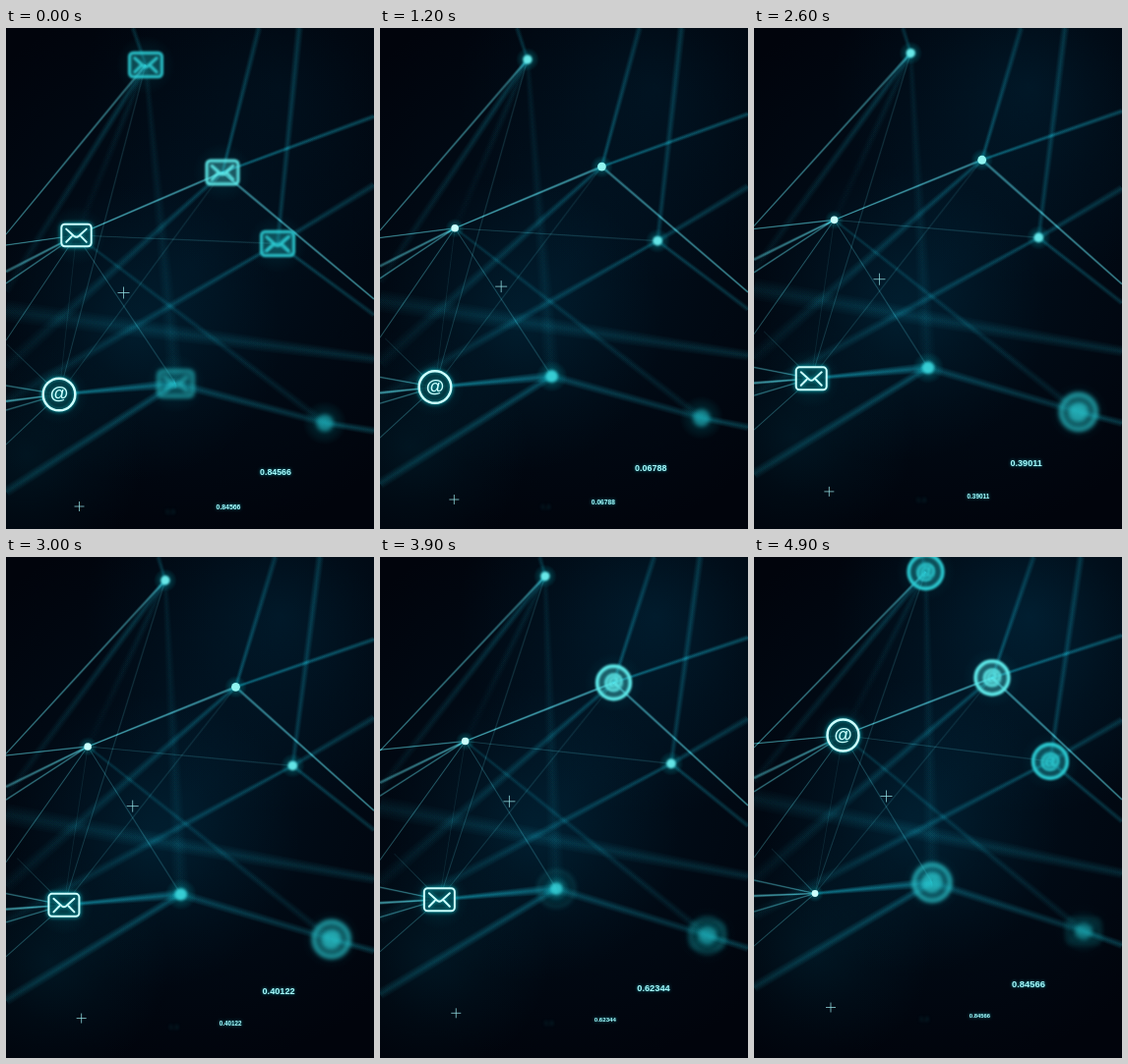
Recreate the animation shown at these times as an HTML page with a canvas. Size 374 by 510 pixels, loop 5000 ms.

```html
<!DOCTYPE html>
<html lang="en">
<head>
<meta charset="utf-8">
<title>Message network</title>
<style>
  html, body { margin: 0; width: 100%; height: 100%; overflow: hidden; background: #01050d; }
  canvas { display: block; width: 374px; height: 510px; }
</style>
</head>
<body>
<canvas id="stage" width="374" height="510"></canvas>
<script>
const W = 374, H = 510, LOOP = 5000, STEP = 100;
const ctx = document.getElementById('stage').getContext('2d');

// Drifting points: x, y at the start and at the end of the loop.
const nodes = {
  A: { path: [142, 37.5, 174.5, 15], r: 4.6, blur: 1.2, size: 1.06, tone: '105,232,232' },
  B: { path: [220, 147, 242, 123], r: 4.4, blur: 0.8, size: 1.03, tone: '145,245,240' },
  C: { path: [71.5, 211, 90.5, 181.5], r: 3.8, blur: 0.4, size: 0.98, tone: '200,255,252' },
  D: { path: [276, 219.5, 301, 208], r: 4.8, blur: 1.2, size: 1.06, tone: '100,228,230' },
  E: { path: [54, 373, 62, 342.5], r: 3.4, blur: 0.3, size: 1, tone: '205,255,252' },
  F: { path: [172.5, 362, 181, 331.5], r: 6.2, blur: 1.9, size: 1.12, tone: '55,205,212' },
  G: { path: [324, 402, 335, 381], r: 8.6, blur: 2.8, size: 1.08, tone: '35,185,195' }
};

// Icon, time it comes in, time it leaves, fade length, strength.
const icons = {
  A: [['mail', -900, 500, 400, .9], ['at', 4000, 6000, 600, .95]],
  B: [['mail', -900, 500, 400, .95], ['at', 3100, 6000, 500, 1]],
  C: [['mail', -900, 500, 400, 1], ['at', 3900, 6000, 500, 1]],
  D: [['mail', -900, 500, 400, .9], ['at', 4000, 6000, 600, .95]],
  E: [['at', -900, 2200, 200, 1], ['mail', 2300, 4500, 200, 1]],
  F: [['mail', -900, 400, 500, .7], ['at', 3800, 6000, 600, .85]],
  G: [['at', 1500, 3600, 400, .9], ['mail', 3800, 4500, 500, .75]]
};

// Anchors on the edges of the stage.
const onLeft = (a, b) => [0, a, 0, b];
const onRight = (a, b) => [W, a, W, b];
const onTop = (a, b) => [a, 0, b, 0];

// From, to, width at each end, strength at each end.
const sharp = [
  ['A', onLeft(210, 194), 3, 1.1, .35, .6],
  ['C', onLeft(221, 190), 1.4, 1.2, .6, .65],
  ['C', onLeft(248, 225), 1.8, 3.2, .65, .4],
  ['C', onLeft(260, 239), 1.4, 1.6, .5, .5],
  ['C', onLeft(318, 306), 1, 1, .42, .4],
  ['C', 'B', 1.2, 2.8, .75, .5],
  ['B', onRight(276, 247), 3, 1.7, .45, .6],
  ['C', 'D', .9, 1.6, .25, .15],
  ['C', 'F', .9, 1.6, .32, .18],
  ['A', 'E', 1.6, .9, .14, .24],
  ['E', 'C', .8, .8, .13, .13],
  ['E', 'B', .9, 2, .2, .08],
  ['E', onLeft(364, 329), 1.2, 1.6, .55, .45],
  ['E', onLeft(380, 345), 1.4, 2.6, .7, .6],
  ['E', onLeft(389, 361), 1.2, 1.6, .5, .4],
  ['E', onLeft(424, 396), .9, 1, .38, .34],
  ['E', [1, 322, 18, 297], .9, .9, .35, .12]
];
const soft = [
  ['B', onRight(90, 80), 3, 5, .5, .36],
  ['B', onTop(257, 284), 4, 6, .38, .22],
  ['D', onTop(298, 332), 5, 7, .26, .24],
  ['D', onRight(160, 166), 5, 7, .28, .24],
  ['D', onRight(292, 269), 4, 5, .32, .24],
  ['D', onLeft(380, 365), 4, 11, .34, .08],
  ['B', onLeft(345, 328), 4, 13, .32, .05],
  ['C', 'G', 3, 8, .2, .12],
  ['E', 'F', 3, 9, .62, .42],
  ['F', 'G', 8, 7, .3, .24],
  ['G', onRight(410, 395), 6, 7, .36, .3],
  ['F', onLeft(472, 438), 7, 9, .34, .2],
  ['A', onTop(129, 171), 4, 5, .28, .2],
  ['A', 'F', 5, 14, .1, .07],
  ['A', onLeft(268, 228), 6, 8, .28, .06],
  ['A', 'C', 6, 8, .14, .02],
  [onLeft(288, 246), onRight(337, 322), 18, 9, .12, .2]
];

const mix = (a, b, p) => a + (b - a) * p;
const clamp = v => Math.max(0, Math.min(1, v));
const rgba = (rgb, a) => `rgba(${rgb},${a})`;

function place(ref, p) {
  const m = typeof ref === 'string' ? nodes[ref].path : ref;
  return [mix(m[0], m[2], p), mix(m[1], m[3], p)];
}

function glow(x, y, r, rgb, a) {
  const g = ctx.createRadialGradient(x, y, 0, x, y, r);
  g.addColorStop(0, rgba(rgb, a));
  g.addColorStop(.5, rgba(rgb, a * .42));
  g.addColorStop(1, rgba(rgb, 0));
  ctx.fillStyle = g;
  ctx.fillRect(x - r, y - r, 2 * r, 2 * r);
}

// Tapered line with soft edges, built from nested quads.
function beam([from, to, w0, w1, a0, a1], p, rgb, layers) {
  const [x, y] = place(from, p), [u, v] = place(to, p);
  const len = Math.hypot(u - x, v - y), nx = (y - v) / len, ny = (u - x) / len;
  const g = ctx.createLinearGradient(x, y, u, v);
  g.addColorStop(0, rgba(rgb, a0 / layers));
  g.addColorStop(1, rgba(rgb, a1 / layers));
  ctx.fillStyle = g;
  for (let i = 1; i <= layers; i++) {
    const k = i / layers * .62, s = w0 * k, e = w1 * k;
    ctx.beginPath();
    ctx.moveTo(x + nx * s, y + ny * s);
    ctx.lineTo(u + nx * e, v + ny * e);
    ctx.lineTo(u - nx * e, v - ny * e);
    ctx.lineTo(x - nx * s, y - ny * s);
    ctx.fill();
  }
}

function drawMail(rgb, fuzzy) {
  ctx.beginPath();
  ctx.roundRect(-15.5, -11.5, 31, 23, 3.5);
  ctx.fillStyle = fuzzy ? rgba(rgb, .3) : 'rgba(2,22,32,.7)';
  ctx.fill();
  ctx.lineWidth = fuzzy ? 3 : 2;
  ctx.stroke();
  ctx.beginPath();
  ctx.moveTo(-10.5, -6.5);
  ctx.lineTo(-2, 1.2);
  ctx.quadraticCurveTo(0, 2.6, 2, 1.2);
  ctx.lineTo(10.5, -6.5);
  for (const s of [-1, 1]) {
    ctx.moveTo(s * 10.5, 7);
    ctx.lineTo(s * 4.8, 1.2);
  }
  ctx.stroke();
}

function drawAt(rgb, fuzzy) {
  ctx.beginPath();
  ctx.arc(0, 0, 16.3, 0, 7);
  ctx.fillStyle = fuzzy ? rgba(rgb, .3) : 'rgba(2,16,26,.75)';
  ctx.fill();
  ctx.lineWidth = fuzzy ? 3.6 : 2.5;
  ctx.stroke();
  if (fuzzy) {
    ctx.beginPath();
    ctx.arc(0, 0, 9.5, 0, 7);
    ctx.fillStyle = rgba(rgb, .55);
    ctx.fill();
  }
  ctx.font = 'bold 19px "Liberation Sans", Arial, sans-serif';
  ctx.fillStyle = ctx.strokeStyle;
  ctx.fillText('@', 0, 0);
}

function drawNode(name, t, p) {
  const n = nodes[name], [x, y] = place(name, p);
  let shown = 0;
  for (const [kind, start, end, fade, power] of icons[name]) {
    const a = clamp((t - start) / fade) * clamp((end + fade - t) / fade);
    if (!a) continue;
    shown = Math.max(shown, a);
    const fuzzy = n.blur > .6;
    const rgb = !fuzzy ? '205,255,253' : name === 'B' ? '95,235,235' : '45,205,212';
    glow(x, y, 30, '0,150,165', .2 * a);
    ctx.save();
    ctx.translate(x, y);
    ctx.scale(n.size, n.size);
    ctx.globalAlpha = a * power;
    ctx.strokeStyle = rgba(rgb, 1);
    ctx.lineCap = ctx.lineJoin = 'round';
    ctx.filter = `blur(${n.blur}px)`;
    if (!fuzzy) {
      ctx.shadowColor = 'rgba(0,205,215,.8)';
      ctx.shadowBlur = 4;
    }
    (kind === 'mail' ? drawMail : drawAt)(rgb, fuzzy);
    ctx.restore();
  }
  if (shown < 1) {
    const dim = name === 'G' ? .6 : 1;
    ctx.save();
    ctx.globalAlpha = (1 - shown) * dim;
    glow(x, y, n.r * 2.6, '0,190,200', .5);
    ctx.filter = `blur(${n.blur * .75}px)`;
    ctx.fillStyle = rgba(n.tone, 1);
    ctx.beginPath();
    ctx.arc(x, y, n.r, 0, 7);
    ctx.fill();
    ctx.restore();
  }
}

function plus(path, r, p) {
  const [x, y] = place(path, p);
  ctx.fillStyle = 'rgba(150,225,228,.75)';
  ctx.fillRect(x - r, y - .5, 2 * r, 1);
  ctx.fillRect(x - .5, y - r, 1, 2 * r);
}

function label(text, path, size, p, color, blur) {
  const [x, y] = place(path, p);
  ctx.save();
  ctx.font = `bold ${size}px "Liberation Sans", Arial, sans-serif`;
  ctx.fillStyle = color;
  if (blur) {
    ctx.filter = `blur(${blur}px)`;
  } else {
    ctx.shadowColor = 'rgba(0,190,205,.8)';
    ctx.shadowBlur = 3;
  }
  ctx.fillText(text, x, y);
  ctx.restore();
}

// Every digit goes up by one each half second.
function counter(t) {
  const n = Math.floor(t / 500 + .5);
  return '0.' + [8, 4, 5, 6, 6].map(d => (d + n) % 10).join('');
}

function draw(t) {
  const p = t / (LOOP - STEP);
  ctx.globalCompositeOperation = 'source-over';
  ctx.fillStyle = '#01040c';
  ctx.fillRect(0, 0, W, H);
  ctx.globalCompositeOperation = 'lighter';
  glow(190, 240, 280, '0,28,40', .5);
  glow(mix(130, 160, p), mix(310, 275, p), 150, '0,45,58', .35);
  glow(mix(20, 60, p), mix(435, 400, p), 120, '0,45,55', .35);
  glow(280, 60, 200, '0,42,58', mix(.2, .55, p));

  for (const e of soft) beam(e, p, '20,150,162', 5);
  for (const e of sharp) beam(e, p, '95,212,214', 3);

  ctx.globalCompositeOperation = 'source-over';
  ctx.textAlign = 'center';
  ctx.textBaseline = 'middle';
  for (const name of 'GFDABCE') drawNode(name, t, p);

  plus([119.5, 269.5, 134.5, 243.5], 6, p);
  plus([74.5, 487, 78, 458.5], 5, p);
  const value = counter(t);
  label(value, [274, 453, 279, 435.5], mix(8.8, 9.4, p), p, '#a9f8fa');
  label(value, [226, 488, 229.5, 467.5], mix(6.9, 5.9, p), p, '#a9f8fa');
  label('0.8', [167, 493, 173, 471], 7, p, 'rgba(20,95,105,.3)', 1.5);
}

const begin = performance.now();
function tick() {
  const t = Math.max(0, performance.now() - begin) % LOOP;
  draw(Math.floor(t / STEP) * STEP);
  requestAnimationFrame(tick);
}
tick();
</script>
</body>
</html>
```
